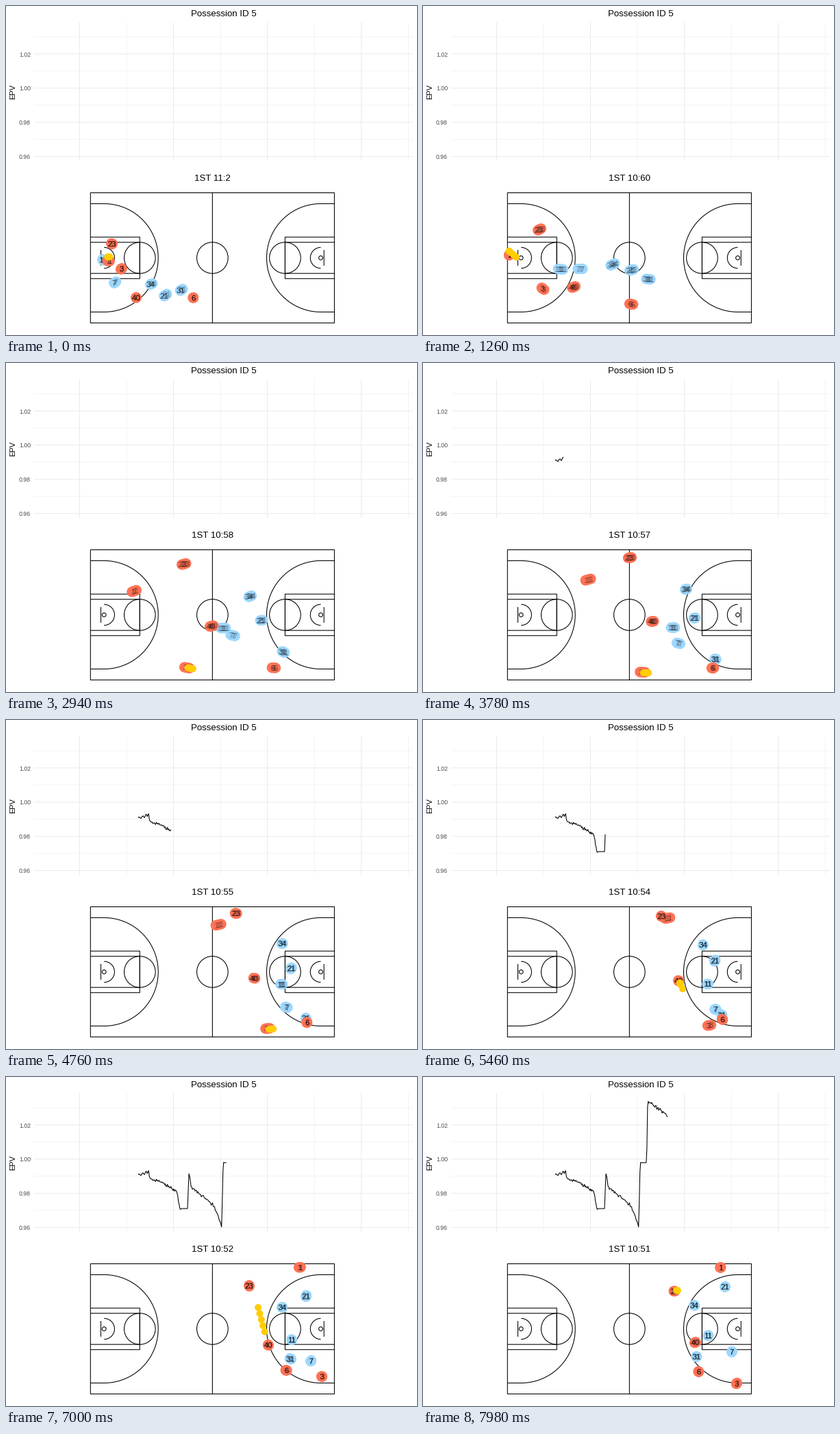
A matplotlib script that plays this animation: 600x480 px, repeating every 8 s.

```python
import matplotlib.pyplot as plt
import numpy as np
from matplotlib.animation import FuncAnimation
from matplotlib.patches import Circle, Rectangle

W, H, DPI = 600, 480, 100
PX = 72 / DPI
STEP, TICK, LOOP = 140, 40, 8000
LAST = LOOP // STEP
RED, BLUE, GOLD = "#FF7256", "#9DD7FF", "#FFCD00"
LW = 1.07 * PX
TRAIL = np.linspace(-0.4, 0.4, 5)

# Each player runs along a quartic through five points
KEYS = [0, 9, 27, 44, LAST]
REDS = {
    "23": [(155, 347), (170, 326), (302, 284), (353, 294), (367.5, 312.5)],
    "40": [(190, 425.5), (220, 410), (335, 377), (378.5, 386), (398, 387)],
    "3": [(169, 383), (175, 412.5), (320.5, 451), (444.5, 440), (457.5, 447.5)],
    "6": [(273.5, 425.5), (304, 435), (423, 445), (426, 432), (402.5, 430)],
    "1": [(151, 372), (126, 363), (241, 316), (397, 282), (434, 278)],
}
BLUES = {
    "11": [(141, 370), (201, 384), (365, 386), (419.5, 385), (416.5, 377)],
    "7": [(158, 404), (229.5, 383.5), (373, 409), (438, 421), (451, 400.5)],
    "34": [(211, 406), (277, 377), (384, 330), (408.5, 332), (396, 333)],
    "21": [(231, 423), (304.5, 385), (396.5, 372), (433, 337), (441, 306)],
    "31": [(254.5, 415), (329, 398.5), (427, 432), (429, 422), (399, 408)],
}
FITS = {n: np.polyfit(KEYS, pts, 4) for n, pts in {**BLUES, **REDS}.items()}


def spot(name, t):
    return np.vander(np.atleast_1d(t), 5) @ FITS[name]


# Ball: who holds it and where beside the player, and when it is passed on
HOLDERS = [("1", (0, -6)), ("3", (5, 1)), ("40", (1.5, 3)), ("23", (4, -1))]
PASSES = [(8.8, 13.5), (36.7, 38.9), (49.1, 51.1)]


def held(k, t):
    name, offset = HOLDERS[k]
    return spot(name, t)[0] + offset


def ball(t):
    for k, (a, b) in enumerate(PASSES):
        if t < a:
            return held(k, t)
        if t < b:
            u = (t - a) / (b - a)
            return (1 - u) * held(k, a) + u * held(k + 1, b)
    return held(len(PASSES), t)


def epv_curve():
    """Drifts and jumps with jitter; passes are flat."""
    turns = [(193, 143.5), (208, 138), (210, 149), (225, 153), (250, 168),
             (254, 192), (265.5, 192), (266.5, 142), (268, 143), (270, 161),
             (303, 187), (315, 217), (317, 125), (326.5, 125), (328, 34),
             (357.5, 57)]
    x = 193 + 1.014 * np.arange(163)
    y = np.interp(x, *zip(*turns))
    jitter = np.random.default_rng(5).normal(0, 1.4, x.size)
    return x, y + jitter * (np.diff(y, prepend=0) != 0)


fig = plt.figure(figsize=(W / DPI, H / DPI), dpi=DPI, facecolor="white")
ax = fig.add_axes([0, 0, 1, 1])
ax.set(xlim=(0, W), ylim=(H, 0))
ax.axis("off")


def line(xs, ys, color="black", lw=LW, **kw):
    return ax.plot(xs, ys, color=color, lw=lw, solid_capstyle="butt",
                   snap=False, **kw)[0]


def label(x, y, s, size, **kw):
    kw = {"ha": "center", "va": "baseline", **kw}
    return ax.text(x, y, s, fontsize=size * PX, family="Liberation Sans", **kw)


def outline(shape):
    shape.set(fill=False, edgecolor="black", linewidth=LW, zorder=2, snap=False)
    ax.add_patch(shape)


def chart():
    for i in range(8):
        major = i % 2 == 0
        lw = LW if major else LW / 2
        x, y = 107.4 + 68.55 * i, 219.6 - 24.95 * i
        line([x, x], [24, 226], "#EBEBEB", lw, zorder=1)
        line([41, 594], [y, y], "#EBEBEB", lw, zorder=1)
        if major:
            label(36, y + 3.6, f"{0.96 + 0.01 * i:.2f}", 8.8,
                  ha="right", color="#4D4D4D")
    label(317.5, 15, "Possession ID 5", 13.2)
    label(13.2, 125, "EPV", 11, rotation=90, rotation_mode="anchor")


def court():
    left, right, top, bottom = 123.3, 479.4, 272.5, 462.4
    mx, my = (left + right) / 2, (top + bottom) / 2
    outline(Rectangle((left, top), right - left, bottom - top))
    line([mx, mx], [top, bottom])
    outline(Circle((mx, my), 22.8))
    a = np.linspace(-np.pi / 2, np.pi / 2, 90)
    for edge, s in ((left, 1), (right, -1)):
        hoop, foul, board = edge + 19.9 * s, edge + 72 * s, edge + 15.2 * s
        for half in (30.3, 22.7):
            line([edge, foul, foul, edge],
                 [my - half, my - half, my + half, my + half])
        outline(Circle((foul, my), 22.8))
        outline(Circle((hoop, my), 2.9))
        line([board, board], [my - 11.4, my + 11.4])
        line(hoop + 15.2 * s * np.cos(a), my + 15.2 * np.sin(a))
        line(np.r_[edge, hoop + 79 * s * np.cos(a), edge],
             np.r_[my - 79, my + 79 * np.sin(a), my + 79])


def discs(r, color, z):
    return [ax.add_patch(Circle((0, 0), r, fc=color, ec="none", zorder=z))
            for _ in TRAIL]


def player(name, color, z):
    tags = [label(0, 0, name, 11.4, alpha=0.32, zorder=z + 1) for _ in TRAIL]
    return name, discs(7.6, color, z), tags


chart()
court()
epv_x, epv_y = epv_curve()
epv = line([], [], zorder=3)
clock = label(301.3, 254.6, "", 13.2)
players = [player(n, BLUE, 4) for n in BLUES] + [player(n, RED, 6) for n in REDS]
ball_discs = discs(5, GOLD, 8)


def update(k):
    i = min((k * TICK + TICK // 2) // STEP, LAST)
    ts = np.clip(i + TRAIL, 0, LAST)

    for name, spots, tags in players:
        for (x, y), disc, tag in zip(spot(name, ts), spots, tags):
            disc.center = x, y
            tag.set_position((x, y + 4.1))
    for t, disc in zip(ts, ball_discs):
        disc.center = tuple(ball(t))

    shown = max(0, 5 * i - 122)
    epv.set_data(epv_x[:shown], epv_y[:shown])

    left = 661.67 - 0.19 * i
    clock.set_text(f"1ST {int(left // 60)}:{round(left % 60)}")
    return []


anim = FuncAnimation(fig, update, frames=LOOP // TICK, interval=TICK,
                     init_func=lambda: update(0), repeat=True, repeat_delay=0)
plt.show()
```
